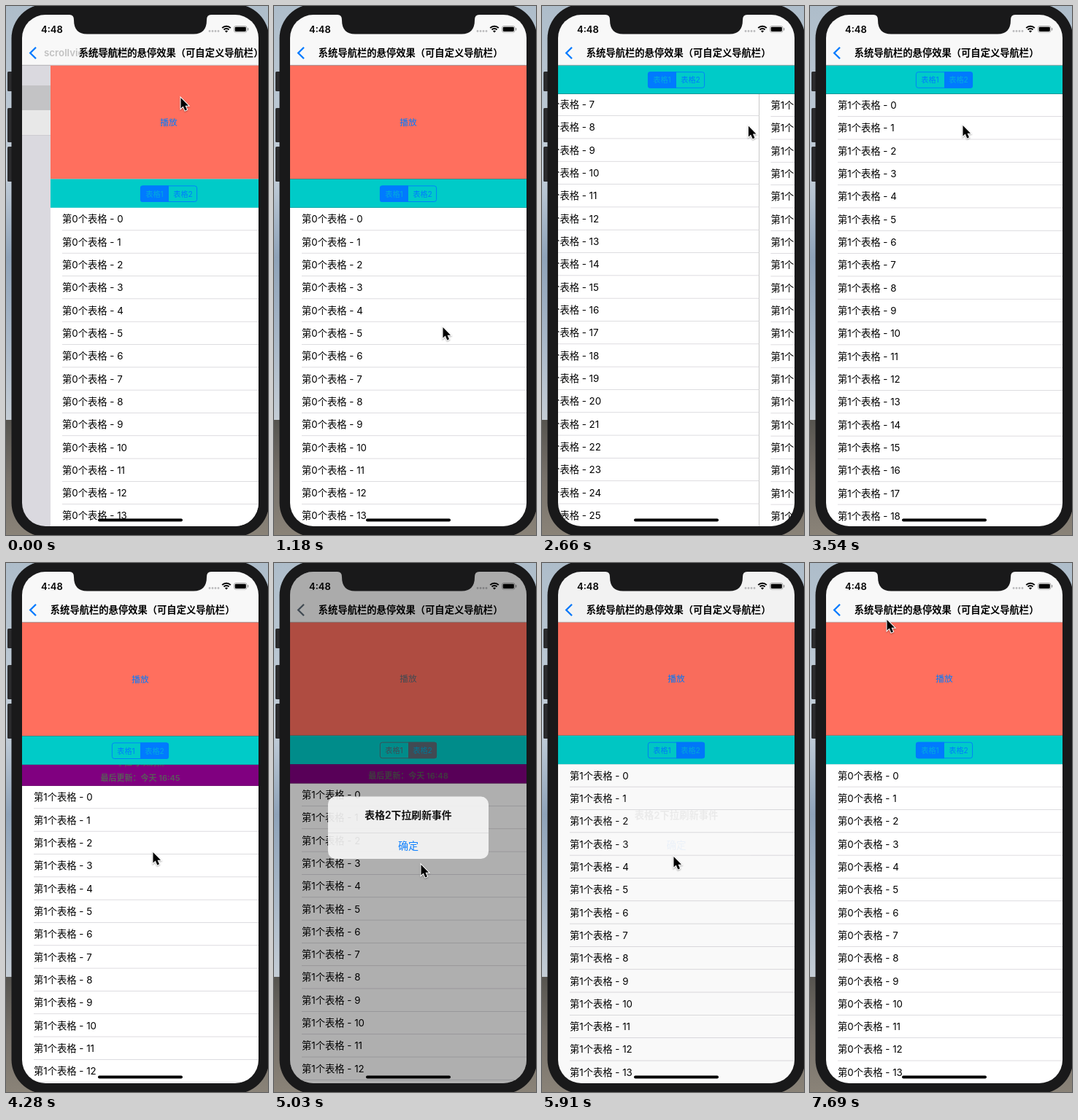
Write an HTML page with a canvas that moves like this. It is 359 px wide and 726 px high and loops after 7990 ms.

```html
<!DOCTYPE html>
<html lang="zh-CN">
<head>
<meta charset="utf-8">
<style>
html, body { margin: 0; width: 100%; height: 100%; overflow: hidden; background: #161616; }
canvas { display: block; width: 359px; height: 726px; }
</style>
</head>
<body>
<canvas id="stage"></canvas>
<script>
const W = 359, H = 726, LOOP = 7990, STEP = 147.8;
const canvas = document.getElementById('stage');
const c = canvas.getContext('2d');
const dpr = window.devicePixelRatio || 1;
canvas.width = W * dpr;
canvas.height = H * dpr;

const FONT = 'Inter, "Noto Sans CJK SC", "Noto Sans CJK", sans-serif';
const BLUE = '#007aff', TEAL = '#00cbc8', SALMON = '#ff6f5e';
const SCREEN = { x: 22, y: 12, w: 324, h: 702 };
const NAV = 81.3, HEAD = 156.2, BAR = 39.3, ROW = 31.32, REFRESH = 42.3;

// Tracks: [step, value...], eased between keys
const PUSH = [[0, 39], [1, 14], [2, 3], [3, 0]];
const SCROLL = [[0, 0], [8, 0], [12, 282.5], [15, 376.5], [23.9, 376.5], [24, HEAD], [28, 0], [33, 0], [34, 0.7]];
const PULL = [[28, 0], [29, 29], [30, 46], [31, REFRESH], [33, REFRESH], [34, 26.3], [36, 0]];
const PAGE = [[17, 0], [19, 0.3], [21, 1], [43, 1], [45, 0.25], [47, 0]];
const ALERT = [[33, 0], [34, 0.78], [35, 1], [39, 1], [40, 0.06], [41, 0]];
const POINTER = [
  [0, 239, 126], [1, 238, 150], [4, 234, 380], [6, 231, 441], [8, 231, 441],
  [12, 231, 159], [14, 231, 152], [16, 290, 166], [17, 296, 165], [21, 209, 164],
  [24, 209, 164], [29, 201, 397], [31, 201, 425], [34, 201, 414], [38, 181, 403],
  [40, 180, 403], [42, 150, 398], [43, 150, 398], [46, 239, 377], [47, 239, 377],
  [49, 188, 443], [50, 188, 443], [51, 150, 265], [52, 105, 78]
];

function at(track, q, i = 1) {
  if (q <= track[0][0]) return track[0][i];
  for (let k = 1; k < track.length; k++) {
    const a = track[k - 1], b = track[k];
    if (q <= b[0]) {
      const u = (q - a[0]) / (b[0] - a[0]);
      return a[i] + (b[i] - a[i]) * u * u * (3 - 2 * u);
    }
  }
  return track[track.length - 1][i];
}

function rect(x, y, w, h, color) {
  c.fillStyle = color;
  c.fillRect(x, y, w, h);
}

function round(x, y, w, h, r) {
  c.beginPath();
  c.roundRect(x, y, w, h, r);
}

function fillRound(x, y, w, h, r, color) {
  round(x, y, w, h, r);
  c.fillStyle = color;
  c.fill();
}

// y is the visual middle of the line
function text(str, x, y, size, color, weight = 400, align = 'left') {
  c.font = `${weight} ${size}px ${FONT}`;
  c.textAlign = align;
  c.fillStyle = color;
  c.fillText(str, x, y + size * 0.37);
}

function clipped(x, y, w, h, draw) {
  c.save();
  c.beginPath();
  c.rect(x, y, w, h);
  c.clip();
  draw();
  c.restore();
}

function wallpaper() {
  const sky = c.createLinearGradient(0, 0, 0, 575);
  sky.addColorStop(0, '#aebdca');
  sky.addColorStop(0.4, '#c3ced9');
  sky.addColorStop(0.6, '#8fa3b9');
  sky.addColorStop(0.8, '#a9b8c8');
  sky.addColorStop(1, '#c6ced6');
  rect(0, 0, W, H, sky);
  const rock = c.createLinearGradient(0, 568, 0, H);
  rock.addColorStop(0, '#56544f');
  rock.addColorStop(0.5, '#77716a');
  rock.addColorStop(1, '#8a8378');
  rect(0, 568, W, H - 568, rock);
}

function body() {
  for (const [y, h] of [[90, 27], [140, 47], [193, 48]]) fillRound(2, y, 9, h, 1.5, '#2b2b2d');
  fillRound(7.5, -2.5, 353, 731, 47, '#19191a');
}

function notch() {
  c.beginPath();
  c.moveTo(86, 11);
  c.lineTo(87, 12);
  c.quadraticCurveTo(93, 12, 93, 19);
  c.quadraticCurveTo(93, 38.5, 111, 38.5);
  c.lineTo(257, 38.5);
  c.quadraticCurveTo(275, 38.5, 275, 19);
  c.quadraticCurveTo(275, 12, 281, 12);
  c.lineTo(282, 11);
  c.fillStyle = '#19191a';
  c.fill();
}

function status() {
  text('4:48', 48, 32, 13, '#000', 600);
  for (let i = 0; i < 4; i++) {
    c.beginPath();
    c.arc(279 + i * 4, 34.5, 1.4, 0, 7);
    c.fillStyle = '#bcbcbe';
    c.fill();
  }
  c.strokeStyle = '#000';
  c.lineWidth = 1.9;
  for (const r of [5, 8.2]) {
    c.beginPath();
    c.arc(302, 36, r, Math.PI * 1.25, Math.PI * 1.75);
    c.stroke();
  }
  c.beginPath();
  c.moveTo(302, 36.5);
  c.arc(302, 36.5, 2.8, Math.PI * 1.25, Math.PI * 1.75);
  c.fillStyle = '#000';
  c.fill();
  round(312.5, 27.5, 17.5, 8.6, 2.4);
  c.strokeStyle = '#999';
  c.lineWidth = 0.8;
  c.stroke();
  fillRound(313.7, 28.7, 15.1, 6.2, 1.3, '#000');
  fillRound(331, 30, 1.3, 3.6, 0.6, '#999');
}

function navBar(push, tint) {
  rect(22, 12, 324, NAV - 12, '#f8f8f8');
  rect(22, NAV - 0.5, 324, 0.5, '#b5b5b8');
  if (push) {
    c.globalAlpha = 0.22 * push / 39;
    text('scrollview嵌套悬停', 52, 64, 13.3, '#000', 600);
    c.globalAlpha = 1;
  }
  text('系统导航栏的悬停效果（可自定义导航栏）', 60.8 + push, 64, 13.3, '#000', 600);
  c.beginPath();
  c.moveTo(41, 56.8);
  c.lineTo(33.2, 64.5);
  c.lineTo(41, 72.2);
  c.strokeStyle = tint;
  c.lineWidth = 2.3;
  c.stroke();
  status();
}

function previousPage() {
  rect(22, NAV, 324, 640, '#dad9df');
  rect(22, 109, 324, 34, '#c3c3c5');
  rect(22, 143, 324, 34, '#e8e8e8');
  rect(22, 177, 324, 0.6, '#c3c3c8');
}

function table(n, x, top, offset) {
  rect(x, top, 324, 720 - top, '#fff');
  const first = Math.max(0, Math.floor(offset / ROW));
  for (let i = first; i < first + 21; i++) {
    const y = top - offset + i * ROW;
    if (y > 716) break;
    text(`第${n}个表格 - ${i}`, x + 16, y + 15.6, 13.3, '#000');
    rect(x + 16, y + ROW - 0.6, 308, 0.7, '#cfced3');
  }
}

function refreshHeader(x, top, pull, q) {
  rect(x, top, 324, pull, '#800080');
  const y = top + pull - REFRESH;
  const state = q >= 31 && q < 34 ? '正在刷新数据中...' : pull > REFRESH ? '松开立即刷新' : '下拉可以刷新';
  text(state, x + 162, y + 10.6, 11, '#5a5a5a', 600, 'center');
  text(`最后更新：今天 ${q < 31 ? '16:45' : '16:48'}`, x + 162, y + 31.6, 11, '#5a5a5a', 600, 'center');
}

function segments(x, y, active, tint) {
  fillRound(x + active * 39, y, 39, 22.4, active ? [0, 3, 3, 0] : [3, 0, 0, 3], tint);
  round(x + 0.4, y + 0.4, 77.2, 21.6, 3);
  c.strokeStyle = tint;
  c.lineWidth = 0.9;
  c.stroke();
  for (let i = 0; i < 2; i++) {
    text(`表格${i + 1}`, x + 19.5 + i * 39, y + 11.3, 10.2, i === active ? '#00aedb' : tint, 400, 'center');
  }
}

function content(q, push, tint) {
  const scroll = at(SCROLL, q), head = Math.min(HEAD, scroll);
  const pull = at(PULL, q), page = at(PAGE, q);
  const x = 22 + push, bar = NAV + HEAD - head, top = bar + BAR;
  clipped(x, NAV, 324, 640, () => {
    clipped(x, top, 324, 600, () => {
      if (page < 1) table(0, x - page * 324, top, q < 24 ? scroll - head : 0);
      if (page > 0) {
        const px = x + (1 - page) * 324;
        table(1, px, top + pull, 0);
        if (pull > 0) refreshHeader(px, top, pull, q);
      }
    });
    rect(x, NAV - head, 324, HEAD, SALMON);
    text('播放', x + 162, NAV - head + 78.4, 11.7, tint, 400, 'center');
    rect(x, bar, 324, BAR, TEAL);
    segments(x + 123, bar + 9, page > 0.5 ? 1 : 0, tint);
  });
}

function alertBox(p, opening) {
  rect(22, 12, 324, 702, `rgba(0,0,0,${0.4 * p})`);
  const k = opening ? 1 + 0.19 * (1 - p) : 1;
  c.save();
  c.globalAlpha = opening ? Math.min(1, p * 1.2) : p;
  c.translate(184, 363.3);
  c.scale(k, k);
  fillRound(-105.6, -41, 211.2, 82, 10, 'rgba(247,247,247,0.97)');
  text('表格2下拉刷新事件', 0, -17, 13.3, '#000', 600, 'center');
  rect(-105.6, 6.8, 211.2, 0.6, '#d0d0d3');
  text('确定', 0, 23.7, 13.5, BLUE, 400, 'center');
  c.restore();
}

function pointer(x, y) {
  c.save();
  c.translate(x, y);
  c.beginPath();
  c.moveTo(0.5, 0);
  for (const [px, py] of [[0.5, 14.6], [3.7, 11.6], [6.3, 17.4], [9, 16.2], [6.5, 10.7], [11, 10.7]]) c.lineTo(px, py);
  c.closePath();
  c.shadowColor = 'rgba(0,0,0,0.35)';
  c.shadowBlur = 2 * dpr;
  c.shadowOffsetY = dpr;
  c.strokeStyle = '#fff';
  c.lineWidth = 2;
  c.stroke();
  c.shadowColor = 'transparent';
  c.fillStyle = '#000';
  c.fill();
  c.restore();
}

function draw(q) {
  c.setTransform(dpr, 0, 0, dpr, 0, 0);
  const push = at(PUSH, q), p = at(ALERT, q);
  const tint = p > 0.5 ? '#5f6b78' : BLUE;
  wallpaper();
  body();
  c.save();
  round(SCREEN.x, SCREEN.y, SCREEN.w, SCREEN.h, 32);
  c.clip();
  if (push) previousPage();
  content(q, push, tint);
  navBar(push, tint);
  if (p > 0) alertBox(p, q < 37);
  fillRound(126, 703.6, 116, 3.9, 2, '#000');
  c.restore();
  notch();
  pointer(at(POINTER, q, 1), at(POINTER, q, 2));
}

const start = performance.now();
function tick() {
  const t = (performance.now() - start) % LOOP;
  draw(Math.min(52, Math.floor((t + 8) / STEP)));
  requestAnimationFrame(tick);
}
tick();
</script>
</body>
</html>
```
